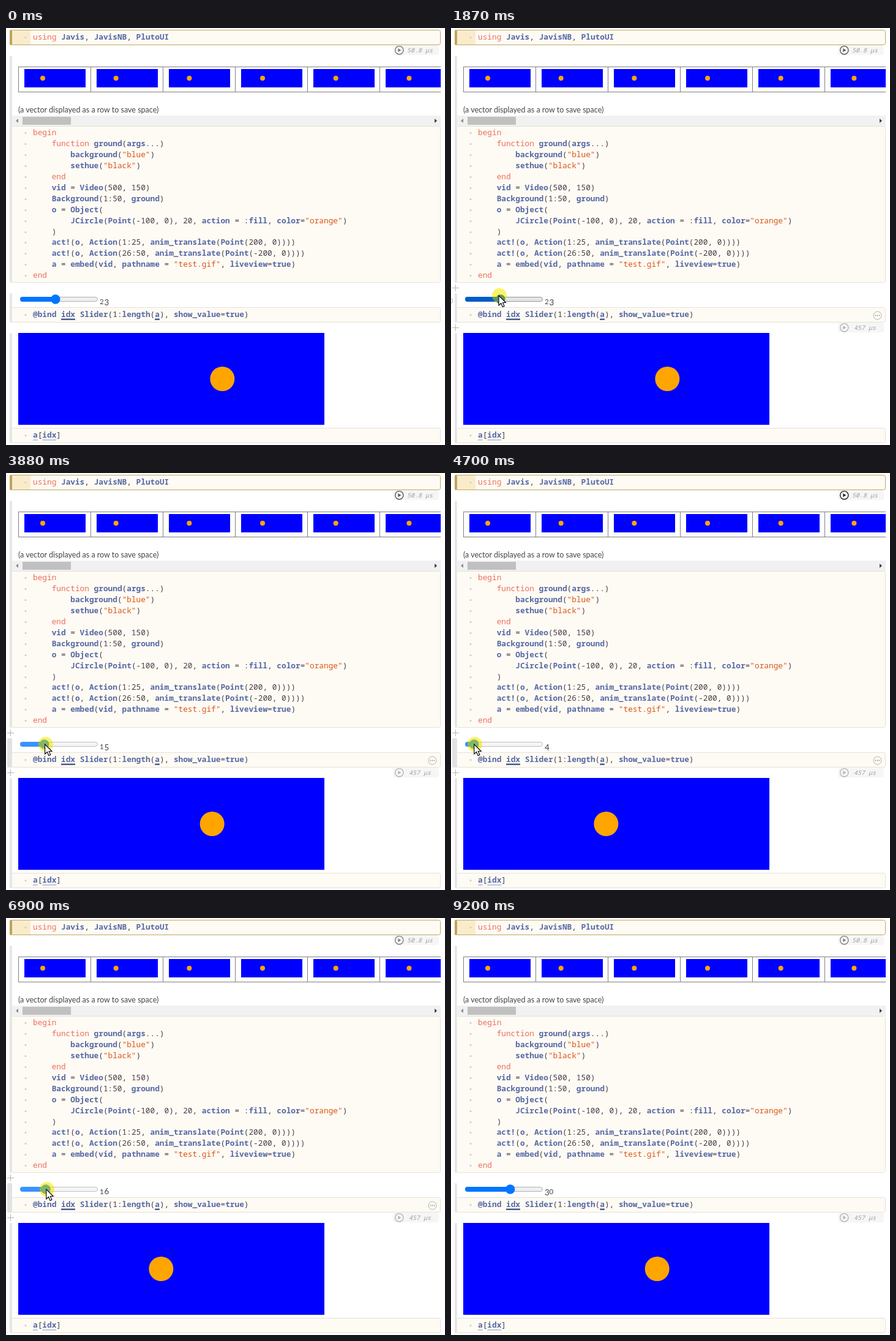
Recreate the animation shown at these times as an HTML page. Size 717 by 681 pixels, loop 9260 ms.

```html
<!DOCTYPE html>
<html lang="en">
<head>
<meta charset="utf-8">
<title>Notebook slider</title>
<style>
  html, body { margin: 0; width: 100%; height: 100%; overflow: hidden; background: #fff; }
  svg { display: block; width: 717px; height: 681px; }
  text { white-space: pre; }
  .code { font: 12.77px "Noto Sans Mono", "DejaVu Sans Mono", monospace; fill: #4a3d49; }
  .kw { fill: #ec6f5b; }
  .str { fill: #da5616; }
  .id { fill: #5668a4; font-weight: 600; }
  .prose { font-family: Lato, "Open Sans", sans-serif; fill: #444; }
  .time { font: italic 500 10px "Noto Sans Mono", monospace; fill: #a0a0a0; }
  .cell { fill: #fefbf4; stroke: #e6e1da; }
  .bar { fill: #e6e6e6; }
  .icon { fill: none; stroke: #b4b4b4; }
  .tint { fill: #fbf57a; mix-blend-mode: multiply; }
  .glow { fill: #faf050; opacity: .4; }
</style>
</head>
<body>
<svg id="stage" viewBox="0 0 717 681"></svg>
<script>
const LOOP = 9260;
const LINE = 17.9;
const CHAR = 7.66;
const stage = document.getElementById('stage');

const program = `begin
    function ground(args...)
        background("blue")
        sethue("black")
    end
    vid = Video(500, 150)
    Background(1:50, ground)
    o = Object(
        JCircle(Point(-100, 0), 20, action = :fill, color="orange")
    )
    act!(o, Action(1:25, anim_translate(Point(200, 0))))
    act!(o, Action(26:50, anim_translate(Point(-200, 0))))
    a = embed(vid, pathname = "test.gif", liveview=true)
end`;

const rect = (x, y, w, h, attrs = '') =>
  `<rect x="${x}" y="${y}" width="${w}" height="${h}" ${attrs}/>`;
const circle = (x, y, r, attrs = '') => `<circle cx="${x}" cy="${y}" r="${r}" ${attrs}/>`;
const path = (d, attrs = '') => `<path d="${d}" ${attrs}/>`;

function highlight(code) {
  return code.replace(/"[^"]*"|@?[A-Za-z_]\w*!?/g, word => {
    const kind = word[0] === '"' ? 'str'
      : /^(using|begin|function|end)$/.test(word) ? 'kw' : 'id';
    return `<tspan class="${kind}">${word}</tspan>`;
  });
}

function codeLine(line, y) {
  const indent = line.search(/\S/);
  return circle(32, y - 3.5, 1.5, 'fill="#d0cdc8"') +
    `<text class="code" x="${44 + indent * CHAR}" y="${y}">${highlight(line.trim())}</text>`;
}

const cell = (y, h) => rect(8.5, y + .5, 701, h, 'rx="3" class="cell"');
const bar = (y, h) => rect(6, y, 4, h, 'rx="2" class="bar"');
const underline = (col, n, y, color) =>
  rect(44 + col * CHAR, y, n * CHAR, 2.5, `fill="${color}"`);

const runtime = (id, y, label, x, color) => `<g id="${id}" stroke="${color}" fill="${color}">
  ${rect(632, y - 8, 75, 16, 'rx="4" fill="#f6f6f6" stroke="none"')}
  ${circle(642.3, y, 6.7, 'fill="none" stroke-width="1.4"')}
  ${path(`M640.3 ${y - 3}v6l5-3z`, 'stroke="none"')}
  <text class="time" stroke="none" x="${x}" y="${y + 4}">${label}</text></g>`;

const plus = y => path(`M2 ${y}h11M7.5 ${y - 5.5}v11`, 'class="icon"');
const menu = y => circle(696.5, y, 6.5, 'class="icon"') +
  [-3, 0, 3].map(d => circle(696.5 + d, y, .9, 'fill="#999"')).join('');

function thumbnails() {
  let out = '';
  for (let i = 0; i < 6; i++) {
    const x = 20 + i * 118;
    out += path(`M${x + .5} 63v42`, 'stroke="#808080"') +
      rect(x + 10, 67, Math.min(100, 700 - x), 30, 'fill="#00f"') +
      circle(60 + i * 119.67, 82, 4, 'fill="#ffa500"');
  }
  return out + path('M20 63.5H710M20 104.5H710', 'stroke="#808080"');
}

stage.innerHTML = `
  ${rect(6.5, 3.5, 703, 24, 'rx="3" fill="#fefbf4" stroke="#bda860"')}
  ${rect(10, 4, 30, 23, 'fill="#faecca"')}
  ${rect(6, 3, 4, 25, 'rx="2" fill="#bda45c"')}
  ${codeLine('using Javis, JavisNB, PlutoUI', 19)}
  ${runtime('firstRun', 36.3, '50.8 µs', 655, '#888')}

  ${thumbnails()}
  <text class="prose" x="20" y="138" font-size="12.5">(a vector displayed as a row to save space)</text>
  ${rect(10, 143, 700, 17, 'fill="#f1f1f1"')}
  ${rect(27, 145, 79, 13, 'fill="#c0c0c0"')}
  ${path('M20 148v7l-4-3.5z', 'fill="#8c8c8c"')}
  ${path('M700 148v7l4-3.5z', 'fill="#404040"')}
  ${cell(160, 255)}${bar(45, 371)}
  ${program.split('\n').map((line, i) => codeLine(line, Math.floor(175.9 + i * LINE))).join('')}

  ${cell(456, 24)}${bar(433, 48)}
  ${rect(2, 433, 8, 48, 'id="busyBar" rx="2" fill="#e2e2e2"')}
  ${codeLine('@bind idx Slider(1:length(a), show_value=true)', 472)}
  ${underline(6, 3, 474.5, '#4a5b96')}${underline(26, 1, 474.5, '#4a5b96')}
  ${rect(23.5, 439.5, 126, 7, 'id="track" rx="3.5"')}
  ${rect(23, 439, 10, 8, 'id="fill" rx="4"')}
  ${circle(81, 443, 7.7, 'id="thumb"')}
  <g id="digits" class="prose"><text/><text/></g>

  ${rect(20, 498, 500, 150, 'fill="#00f"')}
  ${circle(353, 573, 20, 'id="ball" fill="#ffa500"')}
  ${cell(653, 24)}${bar(498, 180)}
  ${codeLine('a[idx]', 669)}
  ${underline(0, 1, 671.5, '#c6cfe6')}${underline(2, 3, 671.5, '#c6cfe6')}

  ${runtime('bindRun', 489.3, '457 µs', 658, '#b4b4b4')}
  <g id="bindHover">${plus(424.5)}${plus(489.5)}${menu(469.5)}</g>
  <g id="resultHover">${plus(489.5)}${plus(685.5)}${menu(666.5)}</g>
  ${circle(-1, 445.5, 4, 'id="eye" class="icon"')}
  ${circle(1, 0, 12, 'id="tint" class="tint"')}
  <g id="pointer">
    ${circle(1, 0, 12, 'class="glow"')}
    ${path('M0 0v16l3.7-3.5 2.6 6 2.8-1.2-2.6-5.8h5z', 'fill="#fff" stroke="#000" stroke-width="1.1"')}
  </g>`;

const part = Object.fromEntries(
  [...stage.querySelectorAll('[id]')].map(el => [el.id, el]));
const digits = [...part.digits.children];

// Tables of [time, value]; the ball works through the slider's values with a delay.
const sliderKeys = [[1940, 23], [2640, 33], [2850, 33], [3120, 26], [4700, 4],
  [4950, 1], [5400, 1], [5720, 3.4], [6000, 3.4], [7780, 29], [7850, 30]];
const ballKeys = [[1940, 23], [2780, 33], [2990, 33], [3120, 31], [4700, 11],
  [5600, 1], [6000, 1], [6900, 11], [7780, 21], [8600, 30]];
const pointerX = [[240, 190], [700, 120], [1130, 78], [1940, 78], [2100, 83]];
const pointerY = [[240, 690], [700, 530], [1130, 437], [1940, 437], [2200, 443],
  [7990, 443], [8300, 540], [8640, 705]];

function at(keys, t) {
  if (t <= keys[0][0]) return keys[0][1];
  for (let i = 1; i < keys.length; i++) {
    const [t0, v0] = keys[i - 1], [t1, v1] = keys[i];
    if (t <= t1) return v0 + (v1 - v0) * (t - t0) / (t1 - t0);
  }
  return keys[keys.length - 1][1];
}

const set = (el, attrs) => { for (const k in attrs) el.setAttribute(k, attrs[k]); };
const show = (el, on) => set(el, { visibility: on ? 'visible' : 'hidden' });
const thumbX = v => 31 + (v - 1) * 111 / 49;
const ballX = v => v <= 25 ? 170 + (v - 1) * 200 / 24 : 370 - (v - 26) * 200 / 24;

const sliderLook = {
  rest: ['#0075ff', '#efefef', '#b2b2b2'],
  hover: ['#005cc8', '#e5e5e5', '#9a9a9a'],
  drag: ['#3793ff', '#f5f5f5', '#c0c0c0'],
};

// Old-style figures: 0-2 are low, 6 and 8 rise, the rest hang below the line.
function drawNumber(n) {
  const chars = String(n);
  digits.forEach((el, i) => {
    const d = chars[i] || '';
    el.textContent = d;
    set(el, {
      x: 153 + i * 7.5,
      y: '34579'.includes(d) ? 453 : 451,
      'font-size': '012'.includes(d) ? 11.5 : 13.4,
    });
  });
}

function render(t) {
  const dragging = t > 1900 && t < 7920;
  const raw = at(sliderKeys, t);
  const value = Math.round(raw);
  const px = dragging && t > 2100 ? thumbX(raw)
    : t >= 7920 ? 97 + Math.max(0, t - 7990) * .08 : at(pointerX, t);
  const py = at(pointerY, t);
  const present = t >= 240 && t < 8640;
  const onBind = present && py < 485;
  const state = dragging ? 'drag' : t >= 1200 && t < 8060 ? 'hover' : 'rest';
  const [accent, track, edge] = sliderLook[state];

  set(part.track, { fill: track, stroke: edge });
  set(part.fill, { fill: accent, width: thumbX(value) - 23 });
  set(part.thumb, { fill: accent, cx: thumbX(value) });
  set(part.ball, { cx: ballX(Math.round(at(ballKeys, t))) });
  drawNumber(value);

  const ink = t < 900 ? '#777' : t < 3950 ? '#555' : t < 5720 ? '#222' : '#808080';
  set(part.firstRun, { stroke: ink, fill: ink });
  for (const el of [part.pointer, part.tint]) {
    set(el, { transform: `translate(${px.toFixed(1)} ${py.toFixed(1)})` });
    show(el, present);
  }
  show(part.bindHover, onBind);
  show(part.resultHover, present && !onBind);
  show(part.bindRun, t >= 880);
  show(part.busyBar, dragging);
  show(part.eye, onBind && !dragging);
}

const start = performance.now();
function tick() {
  render((performance.now() - start) % LOOP);
  requestAnimationFrame(tick);
}
tick();
</script>
</body>
</html>
```
